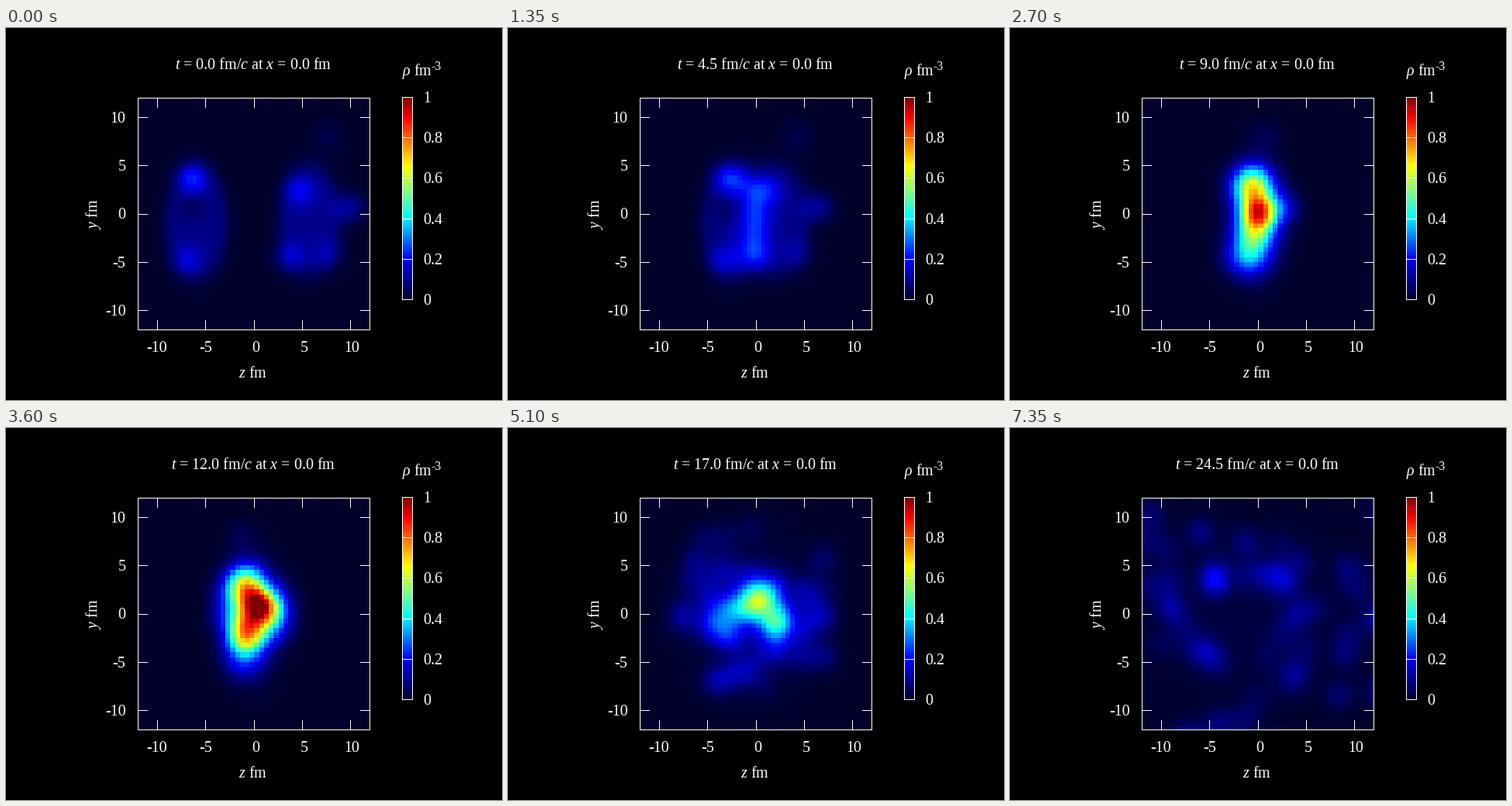
A matplotlib script that plays this animation: 640x480 px, repeating every 7500 ms.

```python
import matplotlib.pyplot as plt
import numpy as np
from matplotlib.animation import FuncAnimation
from matplotlib.colors import LinearSegmentedColormap

plt.rcParams.update({
    "font.family": "Liberation Serif",
    "mathtext.fontset": "custom",
    "mathtext.rm": "Liberation Serif",
    "mathtext.it": "Liberation Serif:italic",
})

W, H, DPI = 640, 480, 100
FRAMES, STEP_MS, DT = 50, 150, 0.5
PX = 72 / DPI
LEFT, RIGHT, TOP, BOTTOM = 170, 469, 90, 389
BAR_L, BAR_R, BAR_T, BAR_B = 511, 524, 89, 350

SPEED = 0.77          # of each nucleus, in units of c
TOUCH, MERGED = 4, 10  # the nuclei dissolve between these times
BURST = 8             # fragments fly out from here

axis = np.arange(-11.75, 12, 0.5)
Z, Y = np.meshgrid(axis, axis)

# Clumps inside each nucleus at t = 0: z, y, density
LEFT_CLUMPS = [(-6.4, 3.7, .16), (-7, -4.9, .09), (-6.4, .9, -.04)]
RIGHT_CLUMPS = [(4.7, 2.4, .11), (3.6, -4.4, .1), (7.8, -4.2, .06)]
SPECTATORS = [(9.8, .7, .1), (7.7, 8, .035)]

# Hot cores: z, y, density at each key time
KEY_T = [4, 6.5, 12, 17, 21, 24.5]
CORES = [
    [(-1, 3, 0), (-.5, 3, .48), (-1, 3.1, .46),
     (0, 1.2, .37), (-3.4, 2.9, .18), (-4.5, 3.5, .18)],
    [(0, 0, 0), (-.2, .2, .32), (.6, .7, .54),
     (2, -.8, .38), (3.7, -.8, .17), (4, 0, .08)],
    [(-.2, -2, 0), (-.2, -2.4, .24), (-.9, -2, .42),
     (-1.7, .3, .2), (.5, 1, .07), (2.6, -2, .04)],
    [(-1, -4, 0), (-1.3, -4.4, .3), (-1.2, -4.8, .15),
     (-4.4, -.8, .1), (-9, 0, .08), (-11.6, 3, .04)],
]

rng = np.random.default_rng(7)
N_FRAGMENTS = 44
angles = np.arange(N_FRAGMENTS) * np.pi * (3 - 5 ** .5)
speeds = rng.uniform(.25, 1, N_FRAGMENTS)
weights = rng.uniform(.025, .075, N_FRAGMENTS)


def blob(z, y, a, sz=1.1, sy=None):
    sy = sy or sz
    return a * np.exp(-((Z - z) / sz) ** 2 / 2 - ((Y - y) / sy) ** 2 / 2)


def nucleus(z, y, rz=3.2, ry=5.7):
    """Flat ellipse with a soft edge."""
    r = np.hypot((Z - z) / rz, (Y - y) / ry)
    return .09 / (1 + np.exp((r - 1) * 8))


def density(t):
    shift = SPEED * t
    intact = np.interp(t, [TOUCH, MERGED], [1, 0])

    field = nucleus(-6 + shift, -.9) + nucleus(5.7 - shift, -.6)
    for clumps, move in ((LEFT_CLUMPS, shift), (RIGHT_CLUMPS, -shift)):
        field += sum(blob(z + move, y, a) for z, y, a in clumps)
    field *= intact
    field += sum(blob(z - shift, y, a) for z, y, a in SPECTATORS)

    # Glow around the cores thins out as it spreads
    age = max(0, t - 12)
    sz, sy = 1.7 + .45 * age, 3.6 + .2 * age
    field += blob(-.2, -.3, (1 - intact) / (sz * sy), sz, sy)

    width = np.interp(t, [12, 21], [1.4, 1.1])
    for path in CORES:
        core = [np.interp(t, KEY_T, column) for column in zip(*path)]
        field += blob(*core, width)

    if t > BURST:
        radius = speeds * (t - BURST)
        rise = np.interp(t, [BURST, 15], [0, 1])
        for r, phi, a in zip(radius, angles, weights):
            field += blob(r * np.cos(phi), r * np.sin(phi), a * rise)
    return field


cmap = LinearSegmentedColormap.from_list("density", [
    (0, "#00002a"), (.2, "#0000ff"), (.41, "#00ffff"),
    (.66, "#ffff00"), (.9, "#ff0000"), (1, "#800000")], N=512)

fig = plt.figure(figsize=(W / DPI, H / DPI), dpi=DPI, facecolor="black")
ax = fig.add_axes([0, 0, 1, 1])
ax.axis("off")


def line(xs, ys):
    ax.plot(xs, ys, color="white", lw=PX, antialiased=False,
            solid_capstyle="butt", zorder=3)


def box(l, r, t, b):
    line([l, r, r, l, l], [t, t, b, b, t])


def label(x, y, s, ha="center", size=20, **kw):
    return ax.text(x, y, s, color="white", fontsize=size * PX, ha=ha,
                   va="baseline", **kw)


def picture(data, l, r, t, b):
    return ax.imshow(data, cmap=cmap, vmin=0, vmax=1, origin="lower",
                     extent=(l + .5, r + .5, b + .5, t + .5), aspect="auto",
                     interpolation="nearest")


heat = picture(density(0), LEFT, RIGHT, TOP, BOTTOM)
picture(np.linspace(0, 1, 261)[:, None], BAR_L, BAR_R, BAR_T, BAR_B)
ax.set_xlim(0, W)
ax.set_ylim(H, 0)

box(LEFT, RIGHT, TOP, BOTTOM)
for v in range(-10, 11, 5):
    x = LEFT + (v + 12) / 24 * (RIGHT - LEFT)
    y = BOTTOM - (v + 12) / 24 * (BOTTOM - TOP)
    for edge, inward in ((LEFT, 12), (RIGHT, -12)):
        line([edge, edge + inward], [y, y])
    for edge, inward in ((TOP, 12), (BOTTOM, -12)):
        line([x, x], [edge, edge + inward])
    label(x + (2.5 if v >= 0 else 0), 418, str(v))
    label(154.5, y + 7, str(v), ha="right")

box(BAR_L, BAR_R, BAR_T, BAR_B)
for v in np.linspace(0, 1, 6):
    y = BAR_B - v * (BAR_B - BAR_T)
    line([BAR_L, BAR_R], [y, y])
    label(538.5, y + 7, f"{v:.1g}", ha="left")

label(318.5, 451, "$z$ fm")
label(118, 240, "$y$ fm", rotation=90, rotation_mode="anchor")
label(511, 61, r"$\rho$ fm", ha="left")
label(548, 54, "-3", ha="left", size=16)
title = label(319, 53, "")


def update(i):
    t = i * DT
    heat.set_data(density(t))
    title.set_text(f"$t$ = {t:.1f} fm/$c$ at $x$ = 0.0 fm")
    return heat, title


anim = FuncAnimation(fig, update, frames=FRAMES, interval=STEP_MS,
                     repeat=True, repeat_delay=0, blit=False)
plt.show()
```
